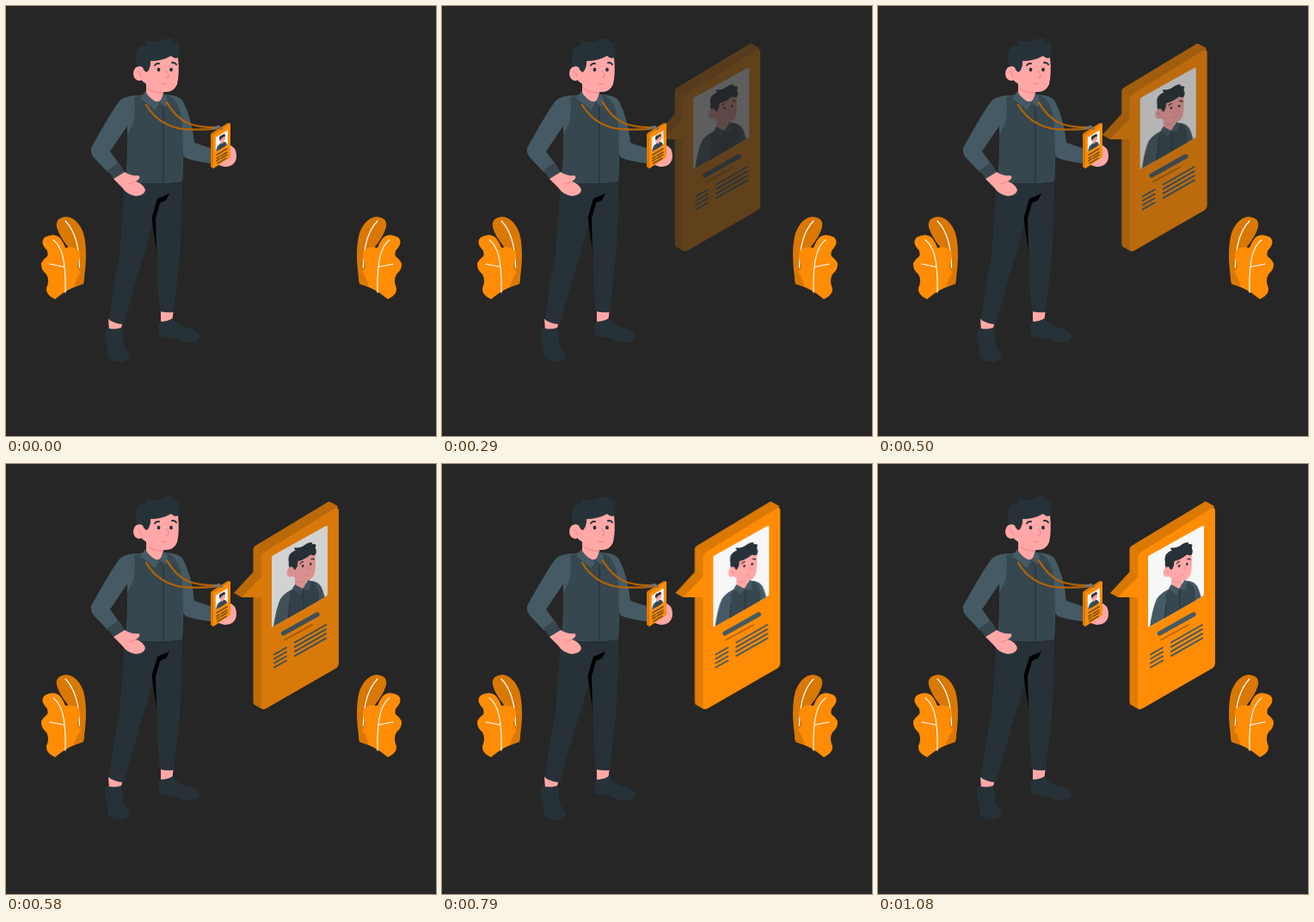
Write an HTML page that moves like this. It is 500 px wide and 500 px high and loops after 1.12 s.

```html
<!DOCTYPE html>
<html lang="en">
<head>
<meta charset="utf-8">
<title>Badge holder</title>
<style>
  html, body { margin: 0; width: 100%; height: 100%; overflow: hidden; background: #262626; }
  svg { display: block; width: 100%; height: 100%; }
  .orange { fill: #ff8c05; }
  .shade { fill: #da7804; }
  .skin { fill: #ffa8a7; }
  .dark { fill: #263238; }
  .sleeve { fill: #455a64; }
  .vest { fill: #37474f; }
  .line { fill: none; stroke-linecap: round; stroke-linejoin: round; }
  .ink { stroke: #263238; }
  .blush { stroke: #f27f82; }
  .strap { stroke: #b26204; stroke-width: 2.3; }
  .vein { stroke: #fff; stroke-width: 1.2; }
  .print { stroke: #455a64; }
  #card { animation: slide 1120ms infinite; }
  @keyframes slide {
    0% { opacity: 0; transform: translateX(-30px); animation-timing-function: cubic-bezier(.36, -.01, .5, 1.38); }
    94.6%, 100% { opacity: 1; transform: none; }
  }
</style>
</head>
<body>
<svg viewBox="0 0 500 500">
  <defs>
    <clipPath id="frame"><path d="M314 109 Q314 107 316 106 L377 72 Q379 71 379 73 V151 Q379 153 377 154 L316 189 Q314 190 314 188Z"/></clipPath>

    <g id="head">
      <path class="skin" d="M163 80 V104 Q168 113 178 111 Q184 107 183 96Z"/>
      <path d="M164 94 Q172 100 183 100 L183 102 Q171 103 164 96Z" fill="#f7979a"/>
      <path class="dark" d="M155 74 Q151 66 151 58 Q151 50 155 48 Q159 45 164 45 Q161 43 162 40 Q171 43 178 41 Q186 37 193 38 Q197 41 193 42 Q199 41 202 45 Q200 47 201 51 Q204 55 200 62 L190 70 L168 84 L160 80Z"/>
      <path class="skin" d="M163 78 Q168 72 168 64 Q181 64 192 58 Q196 62 200 60 Q202 78 199 91 Q195 101 183 100 Q170 99 163 90Z"/>
      <ellipse class="skin" cx="155" cy="78.5" rx="7" ry="8.5"/>
      <path class="skin" d="M157 71 L165 75 V92 L158 87Z"/>
      <path class="dark" d="M151 65 Q160 58 168 62 Q169 71 164 77 Q160 76 159 71 Q155 69 153 71Z"/>
      <g class="dark"><ellipse cx="177.500" cy="74" rx="1.9" ry="2.2"/><ellipse cx="192" cy="74" rx="1.9" ry="2.2"/></g>
      <path class="line ink" stroke-width="2" d="M173 69 Q175 66 178 67 M193 66 Q196 65 198 68"/>
      <path class="line blush" d="M186 75 Q190 80 189 82 L186 83 M181 90 Q184 92 187 90 M153 76 Q156 77 157 82"/>
    </g>

    <g id="photo" clip-path="url(#frame)">
      <path fill="#f7f7f7" d="M310 65 H385 V195 H310Z"/>
      <path class="sleeve" d="M316 190 Q319 168 324 157 Q330 148 342 144 L361 136 Q370 137 373 146 L378 162 V190Z"/>
      <path class="vest" d="M332 190 L335 162 Q333 150 339 145 L361 136 Q368 142 369 152 V190Z"/>
      <use href="#head" transform="matrix(.63 -.157 0 .7 238.4 94.7)"/>
      <path class="sleeve" d="M338 145 L341 140 L350 145 L347 152Z M351 145 L356 135 L360 136 L358 147Z"/>
      <path class="line ink" d="M351 148 V175 M335 162 L333 184"/>
    </g>

    <g id="plant">
      <path class="shade" d="M90 322 Q96 286 90 264 Q83 246 70 245 Q57 246 59 257 Q62 268 72 280 L80 312Z"/>
      <path class="line vein" d="M69 250 Q85 266 85.500 304"/>
      <path class="orange" d="M57 341 Q46 336 47 328 Q51 319 47 312 Q40 306 41 299 Q44 294 48 291 Q50 286 45 281 Q40 274 45 269 Q56 263 63 270 Q67 275 69 281 Q80 279 85 285 Q88 291 83 300 Q82 306 87 309 Q92 313 90 323 Q72 328 57 341Z"/>
      <path class="shade" d="M90 323 Q92 313 88 308 Q82 315 79 327Z"/>
      <path class="line vein" d="M55 272 C64 279 70 293 69 333 M51 300 L68 303.500"/>
    </g>
  </defs>

  <rect width="500" height="500" fill="#262626"/>
  <use href="#plant"/>
  <use href="#plant" transform="matrix(-1 0 0 1 501 0)"/>

  <g id="legs">
    <path class="skin" d="M119 364 L136 367 L133 378 H120Z M180 352 H195 L193 368 L180 367Z"/>
    <path class="dark" d="M117 374 Q125 377 134 374 Q137 382 136 393 Q139 400 144 405 Q143 413 132 414 Q121 413 118 406 Q119 396 115 388 Q114 381 117 374Z"/>
    <path class="dark" d="M179 367 Q188 367 194 363 Q199 371 209 374 Q224 377 225 385 Q223 392 212 391 Q201 390 193 385 Q183 386 178 382 Q176 374 179 367Z"/>
    <path class="dark" d="M138 203 L205 205 Q205 255 202 292 L195 356 Q186 357 179 355 Q175 322 176 285 L172 246 Q164 281 156 303 L137 370 Q128 370 120 365 Q124 325 132 290Z"/>
    <path d="M190 218 L176 224 L169.500 246 L175 285 L174 247 L179 229 L186 226Z"/>
  </g>

  <g id="arm">
    <path class="skin" d="M237 166 L258 161 Q268 163 268 175 Q267 187 254 187 L238 182Z"/>
    <path class="sleeve" d="M184 103 Q201 103 206 111 Q216 130 219 159 L240 166 L238 183 Q215 180 208 176 Q202 168 201 150Z"/>
  </g>

  <g id="torso">
    <path class="sleeve" d="M158 104 Q136 103 130 113 Q120 127 99 165 Q98 171 102 176 L119 194 L131 183 L121 169 L142 138Z"/>
    <path class="vest" d="M118 191 L131 182 L138 193 L125 201Z"/>
    <path class="sleeve" d="M149 107 Q154 103 162 103 L184 103 Q200 105 204 121 Q208 160 205 204 Q175 208 139 204 Q142 174 141 140Z"/>
    <path class="vest" d="M149 106 Q151 122 148 136 L141 150 Q142 178 139 204 Q175 208 205 204 Q207 160 204 132 Q202 110 188 104 L165 103Z"/>
    <path class="line ink" stroke-width="1.2" d="M183 117 V206"/>
    <path class="skin" d="M125 201 L138 193 Q145 198 154 197 Q158 200 151 204 Q160 207 162 214 Q161 220 151 221 Q140 219 135 211Z"/>
    <path class="line blush" stroke-width=".8" d="M143 207 Q147 206 151 204"/>
  </g>

  <use href="#head"/>
  <path class="sleeve" d="M156 108 L162 99 Q167 109 179 113 L174 123Z M179 113 L183 101 L188 107 L186 119Z"/>
  <path class="line ink" stroke-width=".7" d="M157 109 L174 122 L179 113 L186 118"/>

  <g id="badge">
    <path class="line strap" d="M163 115 Q180 143 214 143.500 Q234 144 246 142 M187 112 Q197 130 213 137 Q229 142 248 141"/>
    <path class="shade" d="M238 150 Q238 148 240 147 L258 136 L261 137 L241 189 L238 187Z"/>
    <path class="orange" d="M241 150 L261 136 V174 Q261 176 259 177 L241 189Z"/>
    <path class="line" stroke="#6b747a" stroke-width="2.200" d="M240 143 L247 140 L251 143"/>
    <use href="#photo" transform="matrix(.22 -.0205 0 .205 174.500 137.500)"/>
    <path class="line" stroke="#7b541c" stroke-width="1.700" d="M245 173 L257 166 M245 177 L248 175 M250 174 L257 170 M245 180 L248 178 M250 177 L257 173 M246 183 L256 177"/>
  </g>

  <g id="card">
    <path class="shade" d="M293 100 Q292 97 295 95 L378 45 Q380 43 382 44 L391 49 L388 56 L303 108Z"/>
    <path fill="#e07c04" d="M292.500 101 Q292 98 294 97 L304 104 L306 285 Q303 286 301 284 L294 280 Q292.500 279 292.500 276Z"/>
    <path class="shade" d="M270 150 L293 125 L302 130 V150 L279 155Z"/>
    <path class="orange" d="M279 155 L302 131 V155Z"/>
    <path class="orange" d="M302 110 Q302 105 306 102 L387 52 Q392 49 392 55 V231 Q392 236 388 238 L308 284 Q302 287 302 281Z"/>
    <use href="#photo"/>
    <path class="line print" stroke-width="5.400" d="M327.500 197 L367 174.800"/>
    <path class="line" stroke="#b86504" stroke-width="1.600" d="M329 204.500 L361 187"/>
    <path class="line print" stroke-width="2" d="M317 221.500 l14 -8 m-14 13 l14 -8 m-14 13 l14 -8 m-14 13 l14 -8 M341 207.500 l36 -20.500 m-36 25.700 l36 -20.500 m-36 25.700 l36 -20.500 m-36 25.700 l36 -20.500"/>
  </g>
</svg>
</body>
</html>
```
